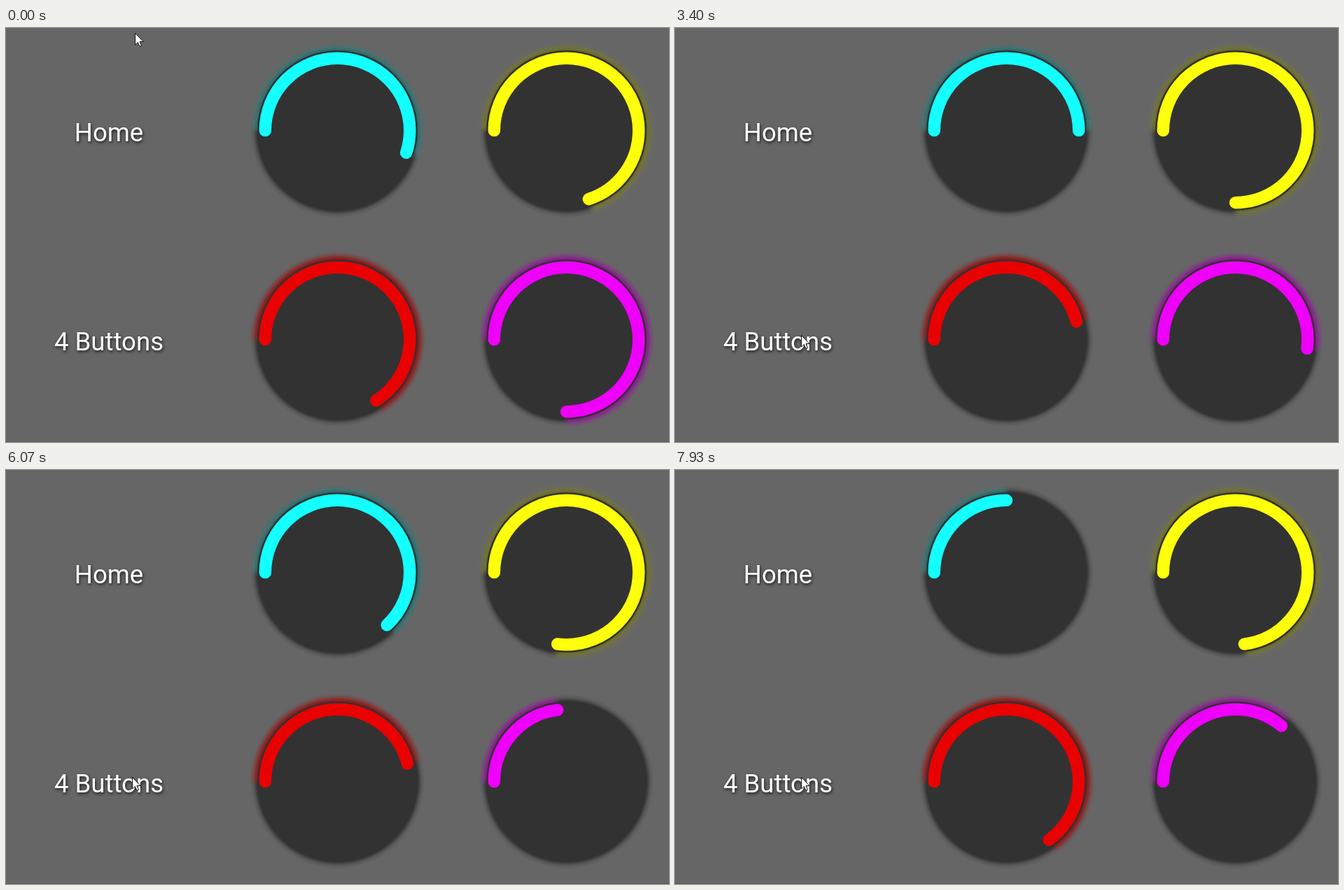
Recreate the animation shown at these times as an HTML page. Size 947x592 px, loop 8000 ms.

```html
<!DOCTYPE html>
<html lang="en">
<head>
<meta charset="utf-8">
<title>Dials</title>
<style>
  html, body { margin: 0; width: 100%; height: 100%; overflow: hidden; background: #666; }
  svg { display: block; }
  text {
    font: 36.6px Roboto, sans-serif; fill: #fff; text-anchor: middle;
    text-shadow: 1px 2px 4px rgba(0, 0, 0, .75);
  }
</style>
</head>
<body>
<svg width="947" height="592" viewBox="0 0 947 592">
  <defs>
    <filter id="soft" filterUnits="userSpaceOnUse" x="-140" y="-140" width="280" height="280">
      <feGaussianBlur stdDeviation="3.7"/>
    </filter>
  </defs>
  <rect y="591" width="947" height="1" fill="#5c5c5c"/>
  <text x="147" y="161.5">Home</text>
  <text x="147" y="460.5">4 Buttons</text>
  <g id="dials"></g>
  <path id="cursor" d="M0 0V16.5L3.8 13 6.4 18.8 9 17.7 6.5 12H11.6Z" fill="#fff" stroke="#111"/>
</svg>
<script>
const LOOP = 8000;
const STAGGER = 80;   // delay from one dial to the next within a refresh
const refreshes = [0, 1600, 2640, 3400, 4330, 5270, 6070, 7000, 7930];

// One percentage per refresh; the last one holds.
const dials = [
  { color: '#14ffff', glow: .3, levels: [55, 35, 94, 50, 73, 51, 63, 0, 25] },
  { color: '#feff0a', glow: .3, levels: [70, 96, 75, 83, 75, 77, 78, 73] },
  { color: '#e90000', glow: .55, levels: [66, 42, 46, 30, 79, 46, 9, 65] },
  { color: '#ee00fa', glow: .5, levels: [75, 24, 52, 8, 5, 23, 14, 36] }
];

function add(parent, tag, attrs) {
  const node = document.createElementNS('http://www.w3.org/2000/svg', tag);
  for (const key in attrs) node.setAttribute(key, attrs[key]);
  return parent.appendChild(node);
}

function addArc(parent, radius, attrs) {
  const half = `A${radius} ${radius} 0 0 1`;
  const d = `M${-radius} 0${half} ${radius} 0${half} ${-radius} 0`;
  return add(parent, 'path', { d, pathLength: 100, fill: 'none', ...attrs });
}

dials.forEach((dial, i) => {
  const x = 473.5 + 327 * (i % 2);
  const y = 146.5 + 299 * Math.floor(i / 2);
  const group = add(document.getElementById('dials'), 'g', { transform: `translate(${x} ${y})` });
  const stroke = dial.color;
  add(group, 'circle', { r: 117, fill: '#222', filter: 'url(#soft)' });
  const halo = add(group, 'g', { filter: 'url(#soft)', opacity: dial.glow });
  const glow = addArc(halo, 114, { stroke, 'stroke-width': 11 });
  add(group, 'circle', { r: 114.5, fill: '#323232' });
  const bar = addArc(group, 103.2, { stroke, 'stroke-width': 17.5, 'stroke-linecap': 'round' });
  dial.arcs = [glow, bar];
});

const cursor = document.getElementById('cursor');
const clamp = (v) => Math.min(1, Math.max(0, v));

function draw(t) {
  dials.forEach(({ levels, arcs }, i) => {
    const latest = refreshes.findLastIndex((start) => start === 0 || t >= start + i * STAGGER);
    const percent = levels[Math.min(latest, levels.length - 1)];
    for (const arc of arcs) {
      arc.setAttribute('stroke-dasharray', `${percent} 200`);
      arc.setAttribute('visibility', percent ? 'visible' : 'hidden');
    }
  });
  // The pointer travels in seven visible steps.
  const p = clamp((Math.floor((t - 730) / 66.6) + 1) / 7);
  const ease = p * p * (3 - 2 * p);
  const x = 184.5 - 4 * p + 7 * Math.sin(Math.PI * p);
  cursor.setAttribute('transform', `translate(${x} ${7.5 + 432 * ease})`);
}

const begin = performance.now();
function tick() {
  draw((performance.now() - begin) % LOOP);
  requestAnimationFrame(tick);
}
tick();
</script>
</body>
</html>
```
